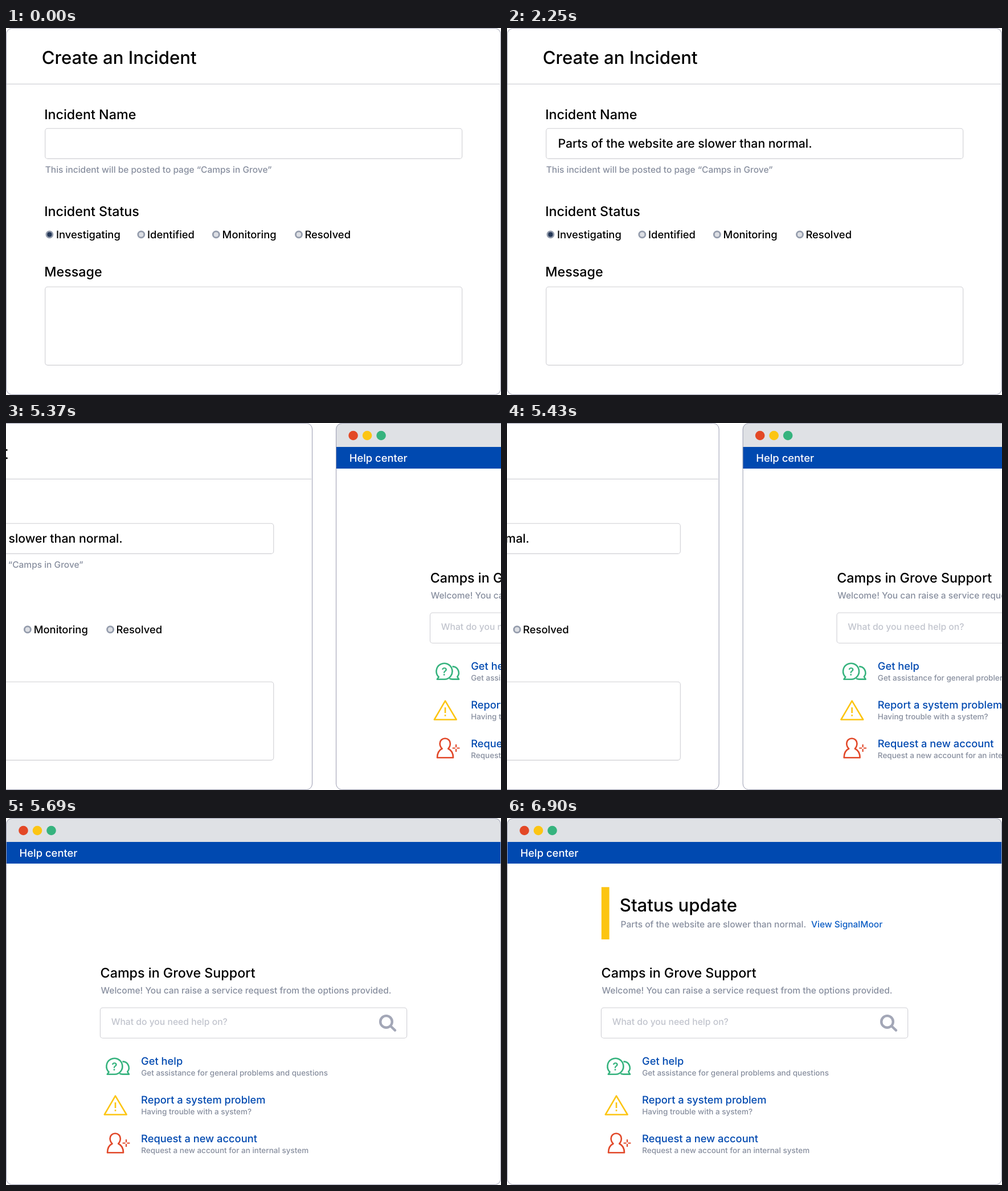
An HTML page for the animation above (8000 ms loop, 869x644 px).

```html
<!DOCTYPE html>
<html lang="en">
<head>
<meta charset="utf-8">
<title>Create an Incident</title>
<style>
html, body { margin: 0; width: 100%; height: 100%; overflow: hidden; background: #fff; }
svg { display: block; width: 869px; height: 644px; }
text { font-family: Inter, Roboto, "Liberation Sans", sans-serif; font-size: 15.5px; font-weight: 450; fill: #000; text-rendering: geometricPrecision; }
.title { font-size: 31.1px; font-weight: 550; }
.head { font-size: 23.3px; font-weight: 550; }
.typed { font-size: 21.25px; }
.label { font-size: 18.4px; }
.note { fill: #878e9e; }
.hint { font-size: 15.7px; fill: #c1c4cd; }
.link { font-size: 18.3px; font-weight: 550; fill: #0049b0; }
.sub { font-size: 13.5px; fill: #878e9e; }
.view { font-weight: 500; fill: #0a5cc4; }
.white { fill: #fff; }
.card { fill: none; stroke: #9a9cb0; }
.box { fill: #fff; stroke: #cfcfd4; stroke-width: 1.1; }
.radio { fill: #dddfe4; stroke: #949cac; stroke-width: 2.8; }
.on { fill: #253858; }
.icon { fill: none; stroke-width: 2.6; stroke-linejoin: round; }
.green { stroke: #36b37e; }
.yellow { stroke: #fcc513; }
.red { stroke: #e2492a; }
</style>
</head>
<body>
<svg viewBox="0 0 869 644">
  <defs>
    <clipPath id="round"><rect width="869" height="644" rx="11"/></clipPath>
  </defs>

  <g id="form">
    <path d="M1 98.3H867" stroke="#d0d1d6" stroke-width="1.2"/>
    <rect class="card" x=".5" y=".5" width="868" height="643" rx="10.5"/>
    <text class="title" x="62.8" y="63">Create an Incident</text>

    <text class="head" x="67.2" y="160.3">Incident Name</text>
    <rect class="box" x="68.7" y="176.2" width="732" height="53.2" rx="4.5"/>
    <text class="typed" id="typed" x="89.4" y="210"></text>
    <text class="note" x="68.7" y="254.3">This incident will be posted to page “Camps in Grove”</text>

    <text class="head" x="67.2" y="330.2">Incident Status</text>
    <circle class="radio on" cx="76.4" cy="362.4" r="5.5"/>
    <circle class="radio" cx="237.3" cy="362.4" r="5.5"/>
    <circle class="radio" cx="368.8" cy="362.4" r="5.5"/>
    <circle class="radio" cx="514" cy="362.4" r="5.5"/>
    <text class="label" x="88" y="369">Investigating</text>
    <text class="label" x="248" y="369">Identified</text>
    <text class="label" x="379.6" y="369">Monitoring</text>
    <text class="label" x="524.4" y="369">Resolved</text>

    <text class="head" x="67.2" y="436.3">Message</text>
    <rect class="box" x="68.7" y="454.2" width="732" height="137.4" rx="4.5"/>
  </g>

  <g id="help">
    <g clip-path="url(#round)">
      <path d="M0 0H869V42H0Z" fill="#dfe1e5"/>
      <path d="M0 42H869V80H0Z" fill="#0049b0"/>
    </g>
    <rect class="card" x=".5" y=".5" width="868" height="643" rx="10.5"/>
    <circle cx="30.5" cy="22" r="8.3" fill="#e34826"/>
    <circle cx="55" cy="22" r="8.3" fill="#fcc513"/>
    <circle cx="79.5" cy="22" r="8.3" fill="#36b37e"/>
    <text class="label white" x="23.6" y="68">Help center</text>

    <g id="update">
      <path d="M165.8 121.3H179.6V213H165.8Z" fill="#fcc513"/>
      <text class="title" x="197.8" y="164">Status update</text>
      <text class="note" x="199.6" y="192.4">Parts of the website are slower than normal.</text>
      <text class="view" x="534" y="192.4">View SignalMoor</text>
    </g>

    <text class="head" x="165.6" y="280.3">Camps in Grove Support</text>
    <text class="note" x="166.6" y="307.6">Welcome! You can raise a service request from the options provided.</text>
    <rect class="box" x="165.4" y="333" width="538.3" height="53.2" rx="4.5"/>
    <text class="hint" x="184.7" y="363.2">What do you need help on?</text>
    <g fill="none" stroke="#a3a7b7" stroke-width="4.4">
      <circle cx="667.5" cy="357.4" r="10.3"/>
      <path d="M675 365L683 372.6" stroke-linecap="round"/>
    </g>

    <g class="icon green">
      <path d="M190.5 449.8H177.8L180.6 445.8A14 14 0 1 1 190.5 449.8Z"/>
      <path d="M204.5 427.4A11 11 0 0 1 213.2 445.4L216 449.6H204.5Q201.5 449.6 199.5 448.4"/>
    </g>
    <text x="190.5" y="442.6" text-anchor="middle" style="font-size:19px;font-weight:600;fill:#36b37e">?</text>
    <text class="link" x="237.1" y="433.4">Get help</text>
    <text class="sub" x="237.2" y="451.6">Get assistance for general problems and questions</text>

    <g class="icon yellow">
      <path d="M192 487.6L172.8 520.5H211.6Z"/>
      <path d="M192 499V509M192 511.8V514.4"/>
    </g>
    <text class="link" x="237.1" y="501.2">Report a system problem</text>
    <text class="sub" x="237.2" y="520.2">Having trouble with a system?</text>

    <g class="icon red">
      <path d="M178 587.3H206C206 578 202.4 574 197.2 571.5C199.6 569 200.8 565.6 200.8 562.2A9.1 8.7 0 0 0 182.6 562.2C182.6 565.6 184 569 186.5 571.5C181.2 574 178 578 178 587.3Z"/>
      <path d="M211 564V569M211 572V577M204.6 570.5H209.6M212.4 570.5H217.4" stroke-width="2.2"/>
    </g>
    <text class="link" x="237.1" y="569.3">Request a new account</text>
    <text class="sub" x="237.2" y="588">Request a new account for an internal system</text>
  </g>
</svg>

<script>
const LOOP = 8000;
const GAP = 910;
const MESSAGE = "Parts of the website are slower than normal.";
const SLIDE = [5280, 5310, 5340, 5370, 5400, 5430, 5470, 5520, 5570, 5630, 5690];

const el = id => document.getElementById(id);
const form = el("form"), help = el("help"), typed = el("typed"), update = el("update");
typed.setAttribute("class", "typed");

// Count of equal steps taken since start, capped at total.
const steps = (t, start, every, total) =>
  Math.max(0, Math.min(total, Math.floor((t - start) / every) + 1));

function draw(t) {
  const keys = steps(t, 1000, 50, 26);
  const text = MESSAGE.slice(0, Math.round(MESSAGE.length * keys / 26));
  if (typed.textContent !== text) typed.textContent = text;

  const shift = GAP * SLIDE.filter(s => t >= s).length / SLIDE.length;
  form.setAttribute("transform", `translate(${-shift})`);
  help.setAttribute("transform", `translate(${GAP - shift})`);

  update.setAttribute("opacity", steps(t, 6720, 30, 7) / 7);
}

const begin = performance.now();
function tick() {
  draw((performance.now() - begin) % LOOP);
  requestAnimationFrame(tick);
}
tick();
</script>
</body>
</html>
```
